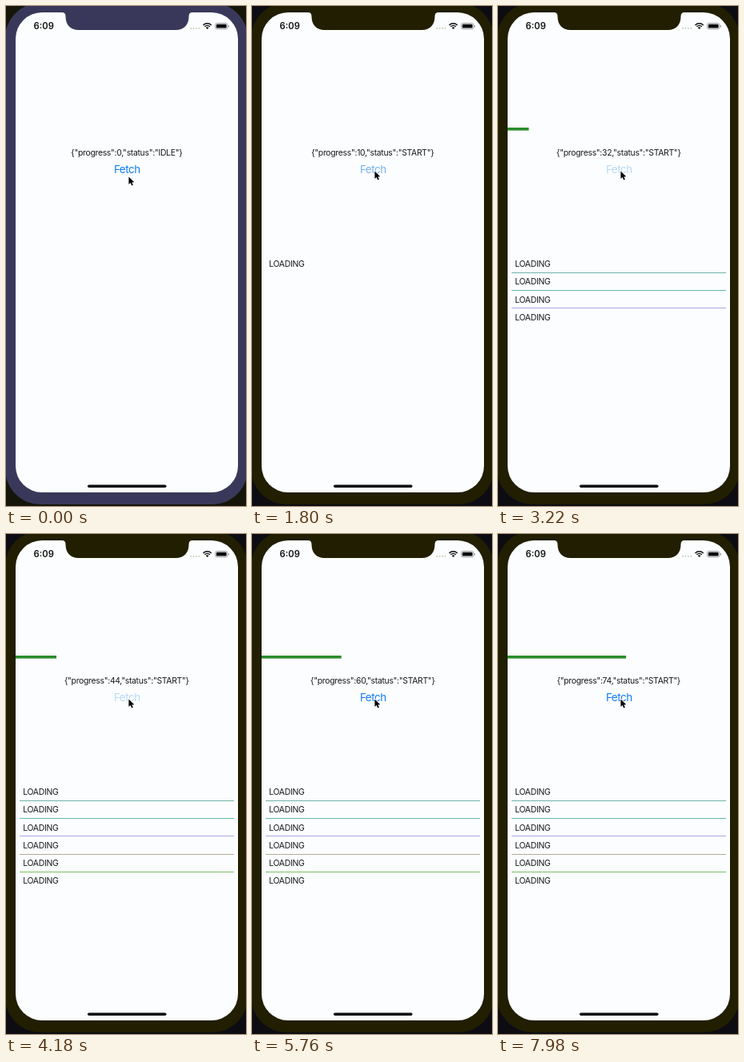
Write an HTML page with a canvas that moves like this. It is 300x625 px and loops after 8 s.

```html
<!DOCTYPE html>
<html lang="en">
<head>
<meta charset="utf-8">
<title>Fetch progress</title>
<style>
  html, body { margin: 0; width: 100%; height: 100%; overflow: hidden; background: #000; }
  canvas { display: block; width: 300px; height: 625px; }
</style>
</head>
<body>
<canvas id="stage"></canvas>
<script>
const LOOP = 8000;
const W = 300, H = 625;
const canvas = document.getElementById('stage');
const ratio = window.devicePixelRatio || 1;
canvas.width = W * ratio;
canvas.height = H * ratio;
const ctx = canvas.getContext('2d');
ctx.scale(ratio, ratio);

const FONT = 'Inter, Roboto, sans-serif';
const SCREEN = { x: 12, y: 8, w: 278, h: 600, r: 33 };
const ROW_TIMES = [1600, 2180, 2680, 3140, 3580, 3980];
const RULES = ['#6fb3aa', '#62b9b0', '#aaa4e6', '#b3ab98', '#7dc061'];

// [time, value] points, joined by straight lines
const PROGRESS = [[1580, 10], [1800, 11], [3220, 33], [4180, 45], [5760, 61], [8000, 75]];
const BAR = [[1960, 0], [2500, 9], [3220, 26.5], [4180, 51], [5760, 99.7], [6800, 124], [8000, 148.5]];
const FETCH_ALPHA = [[1690, 1], [1800, 0.58], [1960, 0.28], [5240, 0.28], [5490, 1]];
const CURSOR_Y = [[260, 213], [420, 211.5], [620, 207.5], [780, 206]];

function track(points, t) {
  if (t <= points[0][0]) return points[0][1];
  for (let i = 1; i < points.length; i++) {
    const [t0, v0] = points[i - 1], [t1, v1] = points[i];
    if (t <= t1) return v0 + (v1 - v0) * (t - t0) / (t1 - t0);
  }
  return points[points.length - 1][1];
}

function roundBox(x, y, w, h, r, color) {
  ctx.beginPath();
  ctx.roundRect(x, y, w, h, r);
  ctx.fillStyle = color;
  ctx.fill();
}

function text(str, x, y, size, { color = '#16181a', weight = 400, align = 'left', gap = 0 } = {}) {
  ctx.font = `${weight} ${size}px ${FONT}`;
  ctx.letterSpacing = gap + 'px';
  ctx.textAlign = align;
  ctx.fillStyle = color;
  ctx.fillText(str, x, y);
}

function drawNotch(color) {
  ctx.beginPath();
  ctx.moveTo(70, 7);
  ctx.lineTo(70, 8);
  ctx.quadraticCurveTo(74.5, 8, 74.5, 13);
  ctx.bezierCurveTo(74.5, 23, 80, 30, 91, 30);
  ctx.lineTo(212, 30);
  ctx.bezierCurveTo(223, 30, 228.5, 23, 228.5, 13);
  ctx.quadraticCurveTo(228.5, 8, 233, 8);
  ctx.lineTo(233, 7);
  ctx.fillStyle = color;
  ctx.fill();
}

function drawPhone(pressed) {
  const bezel = pressed ? '#211e02' : '#3a385a';
  ctx.fillStyle = pressed ? '#0c0c12' : '#15150a';
  ctx.fillRect(0, 0, W, H);
  roundBox(-1, -4, 303, 627, 44, bezel);
  roundBox(SCREEN.x, SCREEN.y, SCREEN.w, SCREEN.h, SCREEN.r, '#fcfdfe');
  drawNotch(bezel);
}

function drawWifi(x, y) {
  ctx.strokeStyle = '#111';
  ctx.lineWidth = 1.5;
  for (const r of [7.2, 4.6]) {
    ctx.beginPath();
    ctx.arc(x, y, r, -Math.PI * 0.75, -Math.PI * 0.25);
    ctx.stroke();
  }
  ctx.beginPath();
  ctx.moveTo(x, y);
  ctx.arc(x, y, 2.7, -Math.PI * 0.75, -Math.PI * 0.25);
  ctx.fillStyle = '#111';
  ctx.fill();
}

function drawStatusBar() {
  text('6:09', 34.6, 29, 11.2, { weight: 600, color: '#111' });
  for (let i = 0; i < 4; i++) roundBox(230.3 + i * 3.4, 27, 1.8, 1.8, 0.9, '#c9c4ac');
  drawWifi(251.6, 29);
  ctx.beginPath();
  ctx.roundRect(261.5, 21.5, 15.4, 7.4, 2.2);
  ctx.strokeStyle = '#8f8f94';
  ctx.lineWidth = 0.8;
  ctx.stroke();
  roundBox(262.8, 22.8, 12.8, 4.8, 1.2, '#0a0a0a');
  roundBox(277.8, 23.9, 1.1, 2.6, 0.6, '#8f8f94');
}

function drawRows(t) {
  const count = ROW_TIMES.filter(start => t >= start).length;
  for (let i = 0; i < count; i++) {
    const y = 326.2 + i * 22.2;
    text('LOADING', 21.3, y, 10.4, { gap: -0.3 });
    if (i < count - 1) {
      ctx.fillStyle = RULES[i];
      ctx.fillRect(17, Math.round(y + 6.8), 268, 1);
    }
  }
}

function drawCursor(x, y) {
  const shape = [[0, 0], [0, 9.6], [2.2, 7.6], [3.8, 11.2], [5.5, 10.4], [3.9, 7], [6.9, 6.8]];
  ctx.beginPath();
  shape.forEach(([dx, dy]) => ctx.lineTo(x + dx, y + dy));
  ctx.closePath();
  ctx.lineJoin = 'round';
  ctx.strokeStyle = '#fff';
  ctx.lineWidth = 1.6;
  ctx.stroke();
  ctx.fillStyle = '#050505';
  ctx.fill();
}

function draw(t) {
  const started = t >= ROW_TIMES[0];
  const value = Math.floor(track(PROGRESS, t) / 2) * 2;
  const state = started
    ? { progress: value, status: 'START' }
    : { progress: 0, status: 'IDLE' };

  drawPhone(t >= 1540);
  drawStatusBar();

  ctx.fillStyle = '#2a8c2c';
  ctx.fillRect(SCREEN.x, 152, track(BAR, t), 3.6);

  text(JSON.stringify(state), 150.8, 187.3, 10.4, { align: 'center', gap: -0.3 });
  ctx.globalAlpha = track(FETCH_ALPHA, t);
  text('Fetch', 151.3, 209.3, 13.4, { color: '#107cf6', align: 'center', gap: -0.45 });
  ctx.globalAlpha = 1;

  drawRows(t);
  roundBox(102, 598.4, 98.5, 3.6, 1.8, '#05050c');
  drawCursor(153.4, track(CURSOR_Y, t) + 0.4);
}

const begin = performance.now();
function tick() {
  draw((performance.now() - begin) % LOOP);
  requestAnimationFrame(tick);
}
tick();
</script>
</body>
</html>
```
